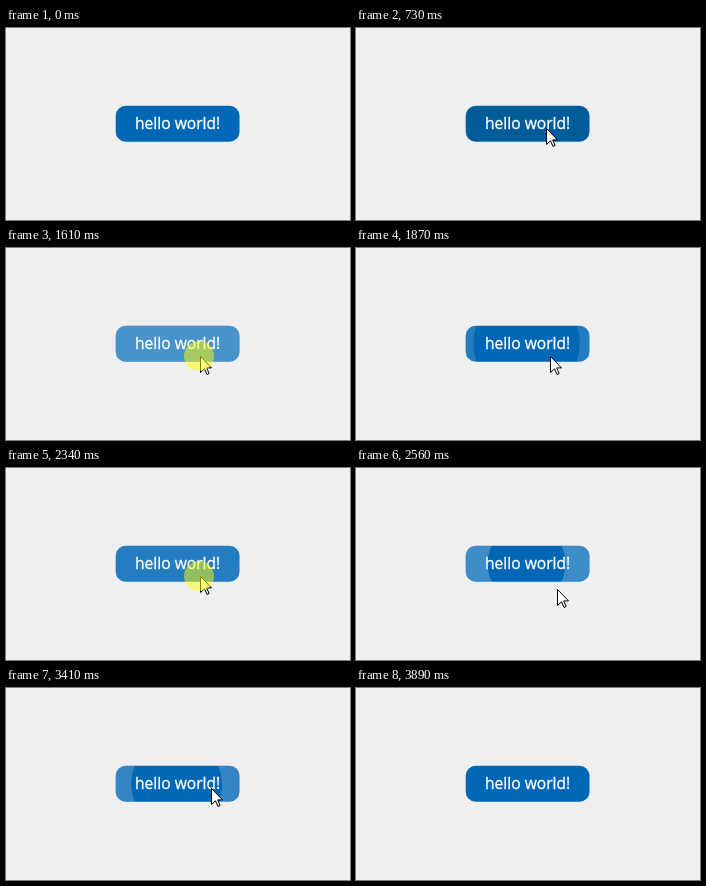
An HTML page with a canvas for the animation above (4500 ms loop, 344 px wide and 192 px high).

```html
<!DOCTYPE html>
<html lang="en">
<head>
<meta charset="utf-8">
<title>Ripple button</title>
<style>
html, body { margin: 0; width: 100%; height: 100%; overflow: hidden; background: #efefef; }
canvas { display: block; width: 344px; height: 192px; }
</style>
</head>
<body>
<canvas width="344" height="192"></canvas>
<script>
const ctx = document.querySelector('canvas').getContext('2d');
const LOOP = 4500, PRESS = 100, RIPPLE = 310, REACH = 71, FADE = 80;
const ENTER = 100, EXIT = 3890;
const BASE = [0, 103, 182], DARK = [0, 91, 153];
const BOX = { x: 109.7, y: 77.7, w: 123.8, h: 36.1 };
const MID = { x: BOX.x + BOX.w / 2 - 1, y: BOX.y + BOX.h / 2 };

// Places the pointer visits
const corner = [273, 183], rest = [190, 100], aim = [194, 108];
const outside = [201, 121], high = [203, 97];

const MOVES = [
  { start: ENTER, time: 500, to: rest },
  { start: 1030, time: 150, to: outside },
  { start: 1180, time: 130, to: aim },
  { start: 2390, time: 160, to: outside },
  { start: 2820, time: 240, to: high },
  { start: 3360, time: 500, to: corner }
];
const PRESSES = [1539, 2290, 3113];

const clamp = k => Math.min(1, Math.max(0, k));
const ease = k => k * k * (3 - 2 * k);
const mix = (a, b, k) => a.map((v, i) => Math.round(v + (b[i] - v) * k));

function pointerAt(t) {
  return MOVES.reduce((p, m) => mix(p, m.to, ease(clamp((t - m.start) / m.time))), corner);
}

function clickAt(t) {
  const start = PRESSES.find(p => t >= p && t < p + PRESS + RIPPLE);
  if (start === undefined) return null;
  const k = (t - start - PRESS) / RIPPLE;
  if (k < 0) return { down: true, radius: 0, light: 0.55 * ((t - start) / PRESS) ** 2 };
  return { down: false, radius: REACH * k, light: 0.55 * (1 - k) };
}

function hovered(t) {
  const [x, y] = pointerAt(t);
  return Math.abs(x - MID.x) < BOX.w / 2 && Math.abs(y - MID.y) < BOX.h / 2 && !clickAt(t);
}

// Share of the last FADE ms spent hovering
function hoverAt(t) {
  const steps = 16;
  let count = 0;
  for (let i = 0; i < steps; i++) count += hovered(t - FADE * i / steps);
  return count / steps;
}

function drawButton(click, hover) {
  ctx.save();
  ctx.beginPath();
  ctx.roundRect(BOX.x, BOX.y, BOX.w, BOX.h, 10);
  ctx.fillStyle = `rgb(${BASE})`;
  ctx.fill();
  if (hover) {
    ctx.beginPath();
    ctx.roundRect(BOX.x + 0.8, BOX.y + 0.8, BOX.w - 1.6, BOX.h - 1.6, 9.2);
    ctx.fillStyle = `rgb(${mix(BASE, DARK, hover)})`;
    ctx.fill();
  }
  if (click) {
    ctx.clip();
    ctx.beginPath();
    ctx.rect(BOX.x - 5, BOX.y - 5, BOX.w + 10, BOX.h + 10);
    ctx.moveTo(MID.x + click.radius, MID.y);
    ctx.arc(MID.x, MID.y, click.radius, 0, Math.PI * 2);
    ctx.fillStyle = `rgba(255,255,255,${click.light})`;
    ctx.fill('evenodd');
  }
  ctx.restore();
  ctx.font = '15.6px "Open Sans", "Noto Sans", sans-serif';
  ctx.textAlign = 'center';
  ctx.fillStyle = ctx.strokeStyle = '#fff';
  ctx.lineWidth = 0.3;
  ctx.fillText('hello world!', MID.x + 1, 101);
  ctx.strokeText('hello world!', MID.x + 1, 101);
}

function drawPointer(x, y) {
  ctx.save();
  ctx.translate(x + 0.5, y + 0.5);
  ctx.fillStyle = '#fff';
  ctx.strokeStyle = '#000';
  ctx.lineWidth = 1;
  const arrow = new Path2D('M0 0V16L4 12.3L6.5 18L8.6 17L6.2 11.4H11Z');
  ctx.fill(arrow);
  ctx.stroke(arrow);
  ctx.restore();
}

function drawHalo(x, y) {
  ctx.beginPath();
  ctx.arc(x - 1, y, 15, 0, Math.PI * 2);
  ctx.fillStyle = 'rgba(255,255,0,0.5)';
  ctx.fill();
}

function draw(t) {
  const click = clickAt(t);
  ctx.fillStyle = '#efefef';
  ctx.fillRect(0, 0, 344, 192);
  drawButton(click, click ? 0 : hoverAt(t));
  if (t < ENTER || t >= EXIT) return;
  const [x, y] = pointerAt(t);
  drawPointer(x, y);
  if (click && click.down) drawHalo(x, y);
}

const begin = performance.now();
function tick() {
  draw((performance.now() - begin) % LOOP);
  requestAnimationFrame(tick);
}
tick();
</script>
</body>
</html>
```
